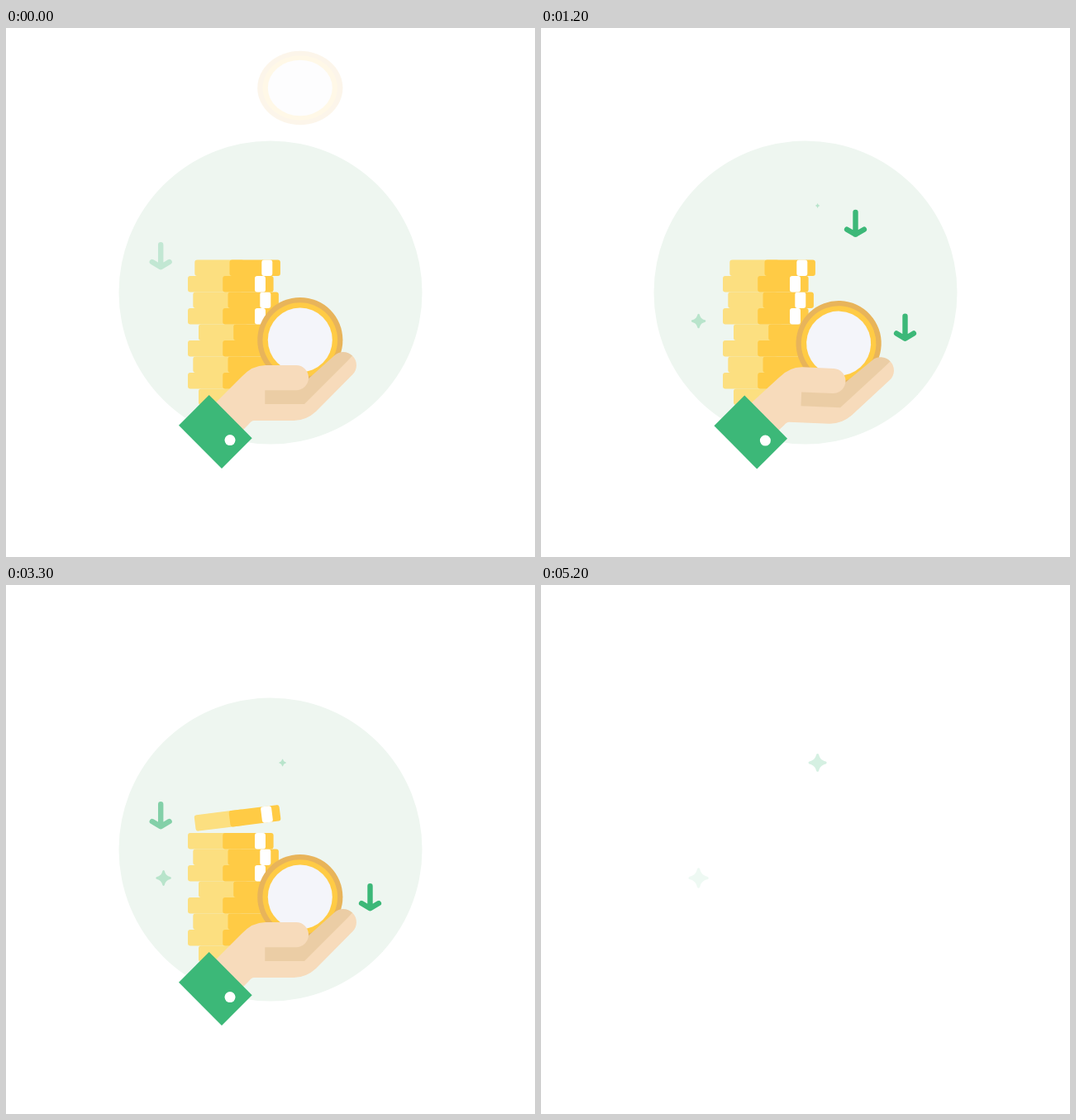
Animation of 640 by 640 pixels, one loop 5300 ms. Source, as an HTML page:

```html
<!DOCTYPE html>
<html lang="en">
<head>
<meta charset="utf-8">
<title>Saving coins</title>
<style>
  html, body { margin: 0; height: 100%; overflow: hidden; background: #fff; }
  svg { display: block; width: 100vw; height: 100vh; }
  .arrow { fill: none; stroke: #3cb878; stroke-width: 6.4; stroke-linecap: round; stroke-linejoin: round; }
</style>
</head>
<body>
<svg viewBox="0 0 640 640">
  <defs>
    <g id="coin">
      <circle r="51.6" fill="#e8b45a"/>
      <circle r="45.3" fill="#ffcb45"/>
      <circle r="39" fill="#f4f5fa"/>
    </g>
    <path id="arrow" class="arrow" d="M0 3.2V30M-10.4 24L0 30.2L10.4 24"/>
    <path id="star" fill="#3cb878"/>
  </defs>
  <g id="scene">
    <circle cx="320" cy="320" r="183.5" fill="#eef6f0"/>
    <g id="stack"></g>
    <use id="falling" href="#coin"/>
    <g id="hand">
      <use href="#coin" x="355.8" y="377.5"/>
      <path fill="#ebcda5" d="M309 434H355L396.7 396.7A16 16 0 0 1 419.3 396.7L364 459H309Z"/>
      <path fill="#f7dbbb" d="M250 457L285 422Q298 408 314 408H351A15 15 0 0 1 351 438.2H313.3V455H361L419.3 396.7A16 16 0 0 1 419.3 419.3L375 464Q363 475 348 475H300Q297 475 294 479L280 493Z"/>
    </g>
    <g id="cuff">
      <path fill="#3cb878" d="M245.7 444L209 480.8L261 533L297.7 496.2Z"/>
      <circle cx="271" cy="498.6" r="6.5" fill="#fff"/>
    </g>
    <g id="arrows"></g>
  </g>
  <g id="stars"></g>
</svg>
<script>
const LOOP = 5300, STEP = 100, SCENE_END = 5200, LAND = 700;
const $ = id => document.getElementById(id);
const clamp = v => Math.max(0, Math.min(1, v));

function add(parent, tag, attrs) {
  const el = document.createElementNS('http://www.w3.org/2000/svg', tag);
  set(el, attrs);
  return parent.appendChild(el);
}
function set(el, attrs) {
  for (const name in attrs) el.setAttribute(name, attrs[name]);
}

// Stack of coins, bottom rows first; only the top four carry a highlight
const ROW = 19.5, rowLefts = [228.3, 220, 226.3, 220, 233, 220, 226.3, 220, 233];
let topCoin;
for (let i = rowLefts.length - 1; i >= 0; i--) {
  const g = add($('stack'), 'g', {});
  const bar = (dx, width, fill) => add(g, 'rect', {
    x: rowLefts[i] + dx, y: 280.5 + i * ROW, width, height: ROW + .1, rx: 3, fill
  });
  bar(0, 60, '#fcdf80');
  bar(42.2, 61.4, '#ffcb45');
  if (i < 4) bar(81, 13, '#fff');
  topCoin = g;
}

// Four-pointed star with rounded tips
let starPath = 'M-1.6-11';
for (let i = 0; i < 4; i++) {
  const a = i * Math.PI / 2, c = Math.cos(a), s = Math.sin(a);
  const p = (x, y) => `${(x * c - y * s).toFixed(2)} ${(x * s + y * c).toFixed(2)} `;
  starPath += 'Q' + p(0, -13.4) + p(1.6, -11) + 'C' + p(3, -5.5) + p(5.5, -3) + p(11, -1.6);
}
set($('star'), { d: starPath + 'Z' });

const arrows = [[187.2, 259, 0], [380.5, 194.7, 400], [440.5, 333, 800]].map(([x, y, delay]) =>
  ({ x, y, delay, el: add($('arrows'), 'use', { href: '#arrow' }) }));

// x, y, start, speed
const stars = [
  [190.6, 354.5, 400, 1], [190.6, 354.5, 2450, 1], [190.6, 354.5, 4050, 1],
  [334.6, 215, 950, 1], [334.6, 215, 2900, 1], [334.6, 215, 4700, 2],
  [390.2, 302, 1580, 1], [390.2, 302, 3520, 1]
].map(([x, y, start, speed]) =>
  ({ x, y, start, speed, el: add($('stars'), 'use', { href: '#star' }) }));

function drawFalling(t) {
  const y = 72.5 + 305 * (t / LAND) ** 1.75;
  const squash = .865 + .135 * clamp(t / 500);
  set($('falling'), {
    transform: `translate(355.8 ${y}) scale(1 ${squash})`,
    opacity: t < LAND ? clamp(.12 + t / 250) : 0
  });
}

function drawHand(t) {
  const dip = 1.75 * Math.sin(Math.PI * clamp((t - LAND) / 520));
  set($('hand'), { transform: `rotate(${11.2 * dip} 258 484)` });
  set($('cuff'), { transform: `translate(${1.9 * dip} ${2.2 * dip}) rotate(${.85 * dip} 253 488)` });
}

function drawTopCoin(t) {
  const fall = clamp((t - 2600) / 800);
  const lift = t < 2600 ? clamp((t - 2500) / 100) : 1 - fall * fall * (3 - 2 * fall);
  const tilt = t > 2500 ? -20 * Math.sqrt(1 - fall) : 0;
  set(topCoin, { transform: `translate(0 ${-196 * lift}) rotate(${tilt} 280 290.5)` });
}

function drawArrow({ x, y, delay, el }, t) {
  const cycle = Math.floor((t - delay + 70) / 1600);
  const phase = t - delay - cycle * 1600;
  const visible = cycle >= 0 && cycle < 3;
  set(el, {
    transform: `translate(${x} ${y + phase * .0312})`,
    opacity: visible ? Math.min(clamp((phase + 70) / 285), clamp((1190 - phase) / 290)) : 0
  });
}

function drawStar({ x, y, start, speed, el }, t) {
  const age = (t - start) * speed;
  set(el, {
    transform: `translate(${x} ${y}) scale(${clamp(age / 1100)})`,
    opacity: age > 0 ? .3 * clamp((1250 - age) / 350) : 0
  });
}

function frame() {
  const t = Math.floor(performance.now() % LOOP / STEP) * STEP;
  set($('scene'), { visibility: t < SCENE_END ? 'visible' : 'hidden' });
  drawFalling(t);
  drawHand(t);
  drawTopCoin(t);
  arrows.forEach(a => drawArrow(a, t));
  stars.forEach(s => drawStar(s, t));
  requestAnimationFrame(frame);
}
frame();
</script>
</body>
</html>
```
